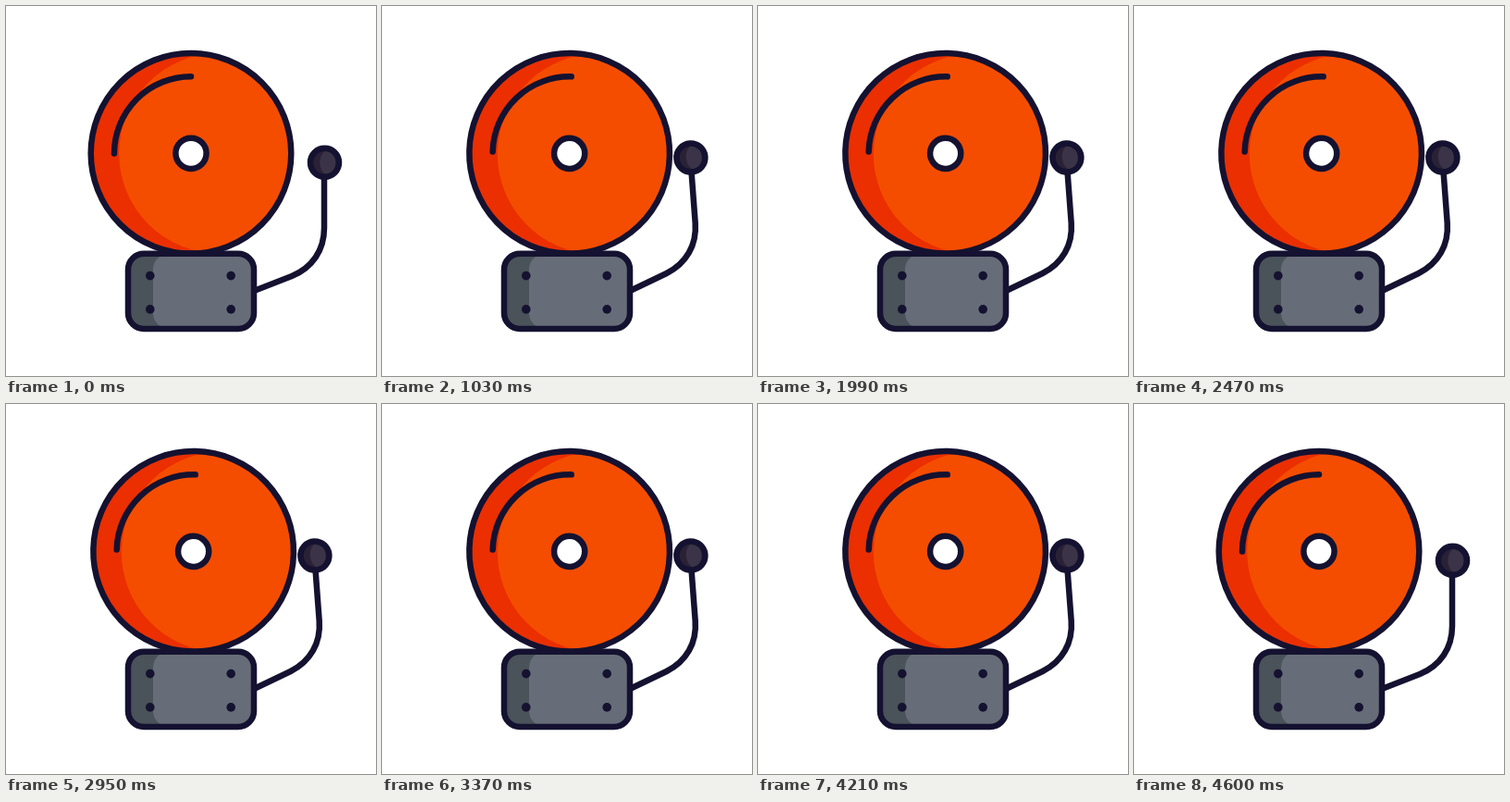
Animation of 400x400 px, one loop 4630 ms. Source, as an HTML page:

```html
<!DOCTYPE html>
<html lang="en">
<head>
<meta charset="utf-8">
<title>Ringing bell</title>
<style>
  html, body { margin: 0; width: 100%; height: 100%; overflow: hidden; background: #fff; }
  svg { display: block; width: 100%; height: 100%; }
  .line { fill: none; stroke: #141230; stroke-width: 6.5; stroke-linecap: round; stroke-linejoin: round; }
</style>
</head>
<body>
<svg viewBox="0 0 400 400">
  <clipPath id="dome"><circle cx="200" cy="159.3" r="108.3"/></clipPath>
  <clipPath id="case"><rect x="132" y="267.8" width="136" height="81.2" rx="17"/></clipPath>

  <g id="hammer">
    <path class="line" d="M268 308 L309 292 C331 283 344 264 344 240 V187"/>
    <circle cx="344.5" cy="169.3" r="15.5" fill="#2a2135"/>
    <ellipse cx="347.8" cy="169.3" rx="8.5" ry="13" fill="#3b3448"/>
    <circle class="line" cx="344.5" cy="169.3" r="15.5"/>
  </g>

  <g id="bell">
    <circle cx="200" cy="159.3" r="108.3" fill="#eb2f00"/>
    <circle cx="230.5" cy="159.3" r="108.3" fill="#f44d00" clip-path="url(#dome)"/>
    <circle class="line" cx="200" cy="159.3" r="108.3"/>
    <path class="line" d="M117 159.5 A83 83 0 0 1 200 76.3"/>
    <circle class="line" cx="200" cy="159.3" r="16.6" style="fill:#fff"/>
  </g>

  <g>
    <rect x="132" y="267.8" width="136" height="81.2" rx="17" fill="#4a525a"/>
    <rect x="159" y="267.8" width="136" height="81.2" rx="17" fill="#676d78" clip-path="url(#case)"/>
    <rect class="line" x="132" y="267.8" width="136" height="81.2" rx="17"/>
    <g fill="#141230">
      <circle cx="155.8" cy="291.6" r="4.8"/>
      <circle cx="243.2" cy="291.6" r="4.8"/>
      <circle cx="155.8" cy="327.9" r="4.8"/>
      <circle cx="243.2" cy="327.9" r="4.8"/>
    </g>
  </g>
</svg>
<script>
  const LOOP = 4630, RING_START = 1030, RING_END = 4600, BEAT = 30;
  const REST = { bell: 0, hammer: 0 };
  const STRIKE = { bell: 1.4, hammer: -4.3 };
  const RECOIL = { bell: -1.4, hammer: 4.6 };
  const bell = document.getElementById('bell');
  const hammer = document.getElementById('hammer');

  function poseAt(time) {
    if (time < RING_START || time >= RING_END) return REST;
    const beat = Math.floor((time - RING_START) / BEAT);
    return beat % 2 ? RECOIL : STRIKE;
  }

  function draw() {
    const pose = poseAt(performance.now() % LOOP);
    bell.setAttribute('transform', `rotate(${pose.bell} 200 268)`);
    hammer.setAttribute('transform', `rotate(${pose.hammer} 268 308)`);
    requestAnimationFrame(draw);
  }
  draw();
</script>
</body>
</html>
```
